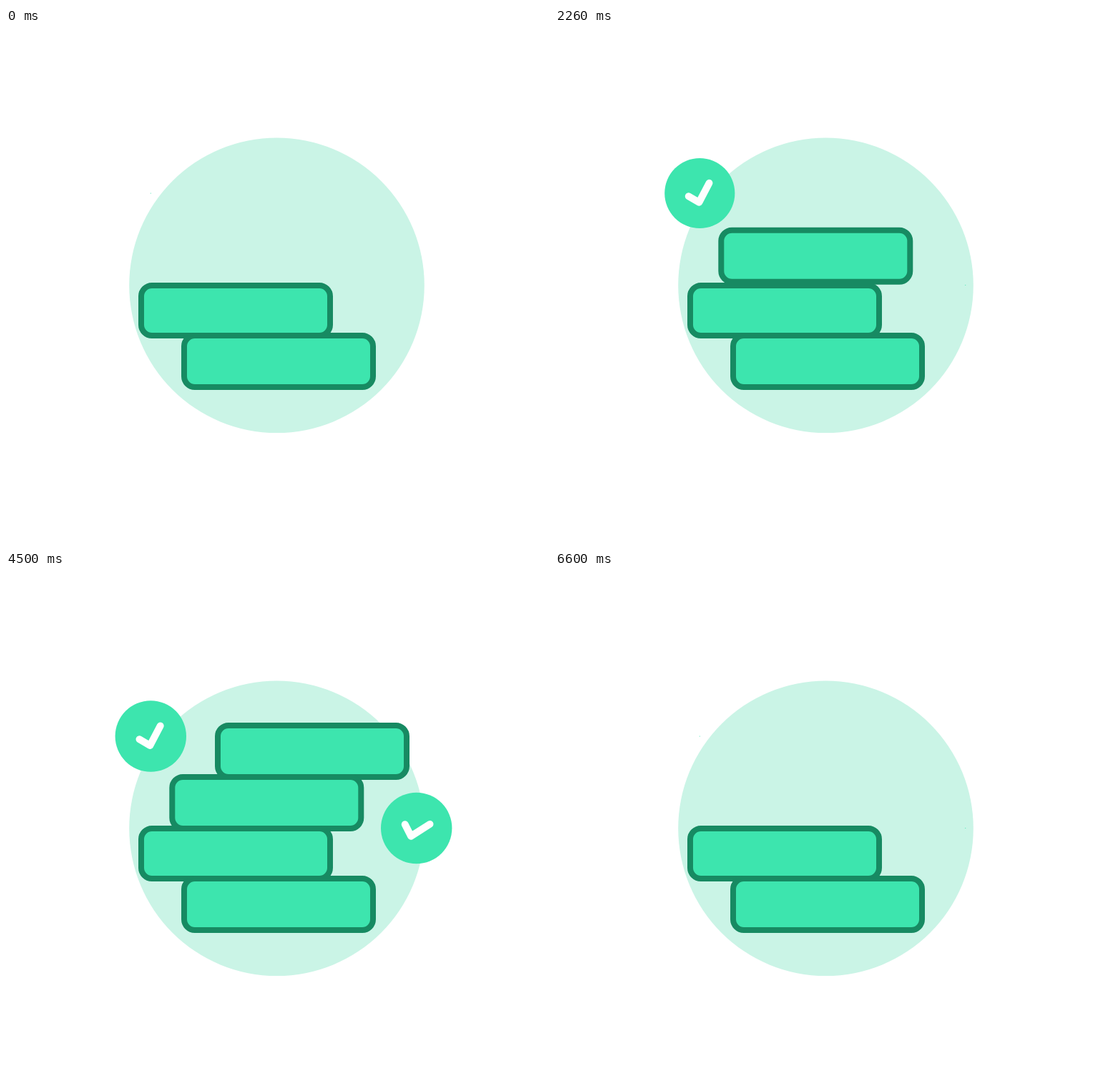
These frames come from a looping animation (759 px wide and 720 px high, 6700 ms). An HTML page with a canvas:

```html
<!DOCTYPE html>
<html lang="en">
<head>
<meta charset="utf-8">
<title>Stacking blocks</title>
<style>
  html, body { margin: 0; width: 100%; height: 100%; overflow: hidden; background: #fff; }
  canvas { display: block; }
</style>
</head>
<body>
<canvas id="stage" width="759" height="720"></canvas>
<script>
const ctx = document.getElementById('stage').getContext('2d');
const LOOP = 6700;
const ENTER_FIRST = 1200, ENTER_SECOND = 3000, EXIT = 5100, DURATION = 1500;
const DROP = 414;
const MINT = '#3de5ae', PALE = '#caf4e6', DARK = '#178a62';

// Critically damped spring from 0 to 1
function spring(ms) {
  if (ms <= 0) return 0;
  if (ms >= DURATION) return 1;
  const x = 6 * ms / 1000;
  return 1 - (1 + x) * Math.exp(-x);
}

function disc(x, y, r, color) {
  ctx.fillStyle = color;
  ctx.beginPath();
  ctx.arc(x, y, r, 0, 2 * Math.PI);
  ctx.fill();
}

function block(x, y, height = 80) {
  ctx.beginPath();
  ctx.roundRect(x + 4, y + 4, 264, height - 8, 15);
  ctx.fillStyle = MINT;
  ctx.fill();
  ctx.strokeStyle = DARK;
  ctx.lineWidth = 8;
  ctx.stroke();
}

function badge(x, y, scale, tick, tickWidth) {
  disc(x, y, Math.max(0.6, 49.7 * scale), MINT);
  ctx.globalAlpha = scale;
  ctx.strokeStyle = '#fff';
  ctx.lineWidth = tickWidth;
  ctx.beginPath();
  for (const [dx, dy] of tick) ctx.lineTo(x + dx * scale, y + dy * scale);
  ctx.stroke();
  ctx.globalAlpha = 1;
}

function draw(t) {
  const leaving = t > EXIT;
  const out = spring(t - EXIT);
  const first = spring(t - ENTER_FIRST) - out;
  const second = spring(t - ENTER_SECOND) - out;
  // Ticks grow with their badge but keep full weight while leaving
  const weight = scale => leaving ? 10 : Math.max(0.01, 10 * scale);

  ctx.fillStyle = '#fff';
  ctx.fillRect(0, 0, 759, 720);
  disc(378.5, 359.8, 206.3, PALE);
  block(292, 212 - DROP * (1 - second));
  block(228.3, 284 - DROP * (1 - first));
  block(185, 356, 78);
  block(245, 426);
  badge(202.3, 231, first, [[-15.8, 4.3], [-1, 13], [13.4, -14.5]], weight(first));
  if (t > ENTER_FIRST) {
    badge(573.7, 359.5, second, [[-16, -5.3], [-7.6, 11.2], [18.8, -5.6]], weight(second));
  }
}

ctx.lineCap = ctx.lineJoin = 'round';
const start = performance.now();
function frame() {
  draw((performance.now() - start) % LOOP);
  requestAnimationFrame(frame);
}
frame();
</script>
</body>
</html>
```
